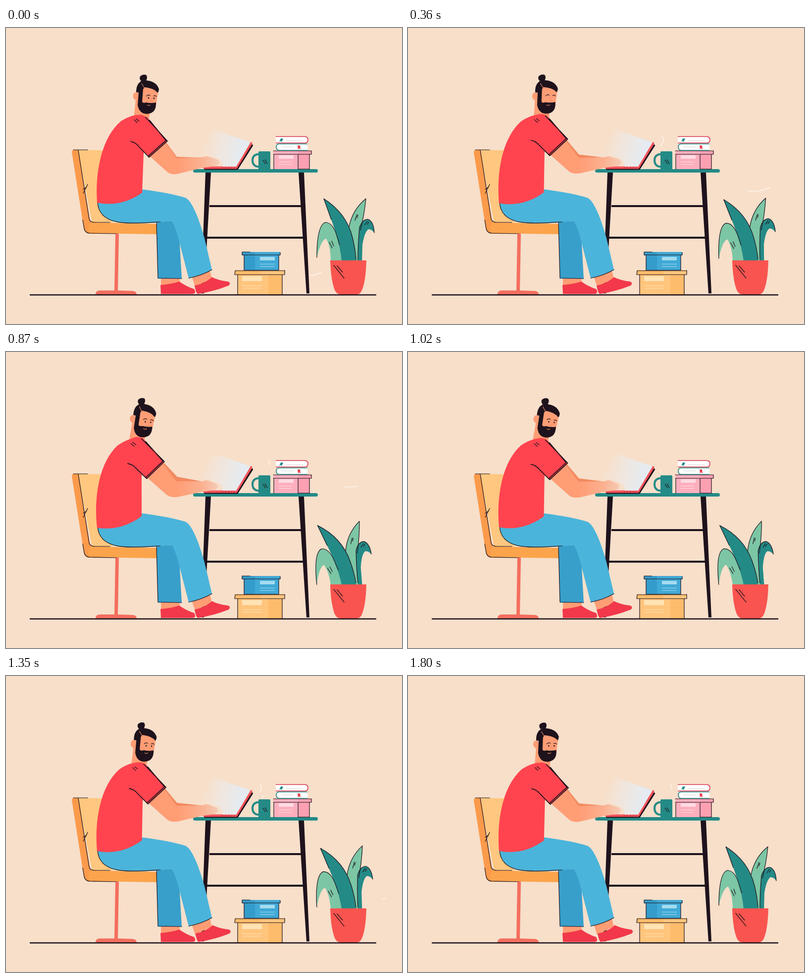
These frames come from a looping animation (800 px wide and 600 px high, 1830 ms). An HTML page:

```html
<!DOCTYPE html>
<html lang="en">
<head>
<meta charset="utf-8">
<title>Working at a desk</title>
<style>
  html, body { margin: 0; height: 100%; overflow: hidden; background: #f7dfca; }
  svg { display: block; width: 100%; height: 100%; }
  .ink { fill: none; stroke: #1e121c; stroke-width: 1.2; stroke-linecap: round; stroke-linejoin: round; }
  .bold { stroke-width: 1.7; }
  .air { fill: none; stroke: #fff6ec; stroke-width: 1.5; }
  .dark { fill: #1e121c; }
  .skin { fill: #ff9d75; }
  .red { fill: #ff444f; }
  .shoe { fill: #f2384a; }
  .teal { fill: #248a86; }
  .mint { fill: #7cc6a5; }
  .edge { fill: none; stroke-linecap: round; stroke-linejoin: round; }
</style>
</head>
<body>
<svg viewBox="0 0 800 600">
  <defs>
    <linearGradient id="glow" gradientUnits="userSpaceOnUse" x1="388" y1="238" x2="472" y2="258">
      <stop offset="0" stop-color="#f7e5d5" stop-opacity="0"/>
      <stop offset=".5" stop-color="#eee8e4" stop-opacity=".75"/>
      <stop offset="1" stop-color="#e5ebf0"/>
    </linearGradient>
    <linearGradient id="armFill" gradientUnits="userSpaceOnUse" x1="345" y1="0" x2="435" y2="0">
      <stop offset="0" stop-color="#ff9d75"/>
      <stop offset=".55" stop-color="#fbb08f"/>
      <stop offset="1" stop-color="#f4d0bd"/>
    </linearGradient>
  </defs>
  <rect width="800" height="600" fill="#f7dfca"/>

  <!-- wind and plant -->
  <g class="air">
    <path id="windLow" d="M611 501C625 504 632 495 642 495H662"/>
    <path id="windSide" d="M708 456C732 460 750 459 767 450"/>
    <path id="windMid" d="M615 330C640 336 652 316 675 326S722 330 745 316"/>
    <path id="windTop" d="M670 268Q692 279 720 269"/>
  </g>
  <g id="leaves">
    <path class="mint" d="M727 346Q724 378 716 410Q711 440 711 482H703Q703 440 693 403Q700 368 727 346Z"/>
    <path class="teal" d="M744 415Q738 407 732 408Q724 414 720 440L719 482H711Q711 440 714 405Q720 387 732 388Q743 393 744 415Z"/>
    <path class="mint" d="M628 465Q628 400 645 394Q660 394 668 420Q677 450 680 482H656Q657 445 647 427Q637 428 628 465Z"/>
    <path class="teal" d="M642 346Q688 375 700 425Q706 450 707 482H679Q676 440 662 402Q652 375 642 346Z"/>
    <g class="ink">
      <path d="M642 346Q688 375 700 425Q706 450 707 470M642 346Q650 368 657 388"/>
      <path d="M693 403Q700 368 727 346Q724 378 716 410"/>
      <path d="M711 470Q711 440 714 405Q720 387 732 388Q743 393 744 415"/>
      <path d="M628 465Q628 400 645 394Q660 394 668 420L674 440"/>
      <path d="M653 434l6 12M658 432l4 10M705 390l4-12M709 385l2-6M725 399l5-7M730 398l3-5"/>
    </g>
  </g>
  <path fill="#f9544f" d="M655 471H728Q727 515 718 534Q714 540 708 540H676Q668 540 664 531Q656 510 655 471Z"/>
  <path class="ink" d="M662 481L683 507M669 482L680 495"/>

  <!-- chair -->
  <path fill="#ffc77f" d="M145 247L197 248L215 394H174Z"/>
  <path fill="#fb9a4b" d="M133 252Q133 247 138 247H146L169 387Q170 395 178 395H200V417H171Q159 417 157 405Z"/>
  <path fill="#fba44c" d="M172 394L304 397V418L168 416Q163 405 172 394Z"/>
  <path class="ink" d="M136 247H165M146 248L168 387Q170 394 180 394H210M155 389L158 407Q160 416 170 416L225 417M156 335L165 317M156 327L163 322"/>
  <path fill="#f46e5e" d="M221 417H228L226 532L256 533Q264 534 264 540H181Q181 532 190 532H219Z"/>

  <!-- desk -->
  <path class="dark" d="M403 293H414L400 538H394ZM591 293H602L613 538H607ZM411 359H597V363H411ZM404 423H601V427H404Z"/>
  <rect class="teal" x="378" y="286" width="252" height="7" rx="3.5"/>

  <!-- boxes on the floor -->
  <path fill="#ffc57d" d="M462 491H563V500H558V540H468V500H462Z"/>
  <path fill="#fdbc6c" d="M530 500H558V540H530ZM462 491H515V500H462Z"/>
  <path fill="#ffe3b5" d="M477 503H517V513H477ZM477 522H517V523H477ZM477 527H517V528H477Z"/>
  <path class="ink" d="M563 491V500H462L463 492H563M468 500V540M558 500V540"/>
  <path fill="#41a9d6" d="M477 454H554V461H551V491H481V461H477Z"/>
  <path fill="#349ccb" d="M481 461H503V491H481ZM477 454H503V461H477Z"/>
  <path fill="#a5dcef" d="M513 464H543V471H513ZM513 478H543V479H513ZM513 483H543V484H513Z"/>
  <path class="ink" d="M493 454H477V460H554V455M481 461V491H551V461"/>

  <!-- box, books and mug on the desk -->
  <path fill="#fdafbe" d="M540 249H617V256H613V286H542V256H540Z"/>
  <path fill="#fca0b2" d="M590 256H613V286H590ZM590 249H617V256H590Z"/>
  <path fill="#ffdbe2" d="M551 258H581V265H551ZM551 271H578V272H551ZM551 276H578V277H551Z"/>
  <path class="ink" d="M540 249H617V256H540M613 256V286H590V256M541 257V286"/>
  <path fill="#fff" stroke="#d63a52" stroke-width="1.7" d="M545 220H604Q610 221 610 226Q610 233 604 233H545"/>
  <path fill="#fff" stroke="#248a86" stroke-width="1.7" d="M609 235H551Q546 236 546 241Q546 247 551 248H609"/>
  <path class="teal" d="M555 224H560L557 231L555 229L552 231Z"/>
  <path fill="#e84250" d="M589 238H594L595 246L592 244L590 246Z"/>
  <path fill="none" stroke="#d8d8dc" d="M565 228H600M556 241H582"/>
  <rect class="teal" x="510" y="250" width="24" height="37" rx="2"/>
  <path fill="none" stroke="#248a86" stroke-width="4" d="M512 256H508Q498 258 498 268Q498 279 508 281H512"/>
  <path class="ink" d="M519 268L524 275M523 267L528 275"/>
  <g class="air">
    <path id="steamA" d="M512 245C506 234 522 236 513 219"/>
    <path id="steamB" d="M518 248C520 238 528 238 519 223"/>
    <path id="steamC" d="M533 247C526 238 536 232 530 218"/>
  </g>

  <!-- legs -->
  <path class="skin" d="M313 506H350L352 518L313 523ZM375 503L412 492L416 508L382 524Z"/>
  <path class="shoe" d="M312 521Q335 519 350 514Q366 525 380 529Q386 539 376 539H313Z"/>
  <path id="foot" class="shoe" d="M381 522Q402 518 416 505Q430 512 449 514Q455 517 450 522Q420 534 388 539Q384 539 381 522Z"/>
  <path fill="#389fcb" d="M304 393L337 391L350 420L355 508H307Z"/>
  <path class="ink" d="M304 395L307 507L355 508"/>
  <path fill="#4bb4da" d="M185 350Q230 350 274 327Q330 334 362 344C376 349 391 390 401 426L416 490Q395 502 369 507L350 433Q343 405 335 391L310 394C245 398 187 403 185 350Z"/>
  <path class="ink" d="M185 354C189 402 245 397 312 393M369 507Q395 502 416 490"/>

  <!-- laptop -->
  <path class="edge" stroke="#1e121c" stroke-width="4" d="M402 285.500H467L497 238"/>
  <path class="edge" stroke="#f5535a" stroke-width="5" d="M401 283H465L495 234"/>
  <path stroke="#c93a48" stroke-width="2" stroke-dasharray="3 3" d="M436 283H462"/>

  <!-- man -->
  <g id="head">
    <path class="skin" d="M263 136L258 184Q275 190 289 184L291 160Z"/>
    <path fill="#f28b65" d="M270 164Q278 174 290 172L289 177Q274 176 270 164Z"/>
    <ellipse class="skin" cx="263" cy="138" rx="6.5" ry="8"/>
    <path class="skin" d="M272 114L298 116Q308 124 307 132L303 156L275 165Z"/>
    <path class="dark" d="M263 130Q263 108 280 106Q304 107 309 124Q308 132 306 131Q299 122 280 120L277 124L275 149Q276 153 283 151Q293 153 303 151Q304 173 285 174Q269 174 266 156L268 131Z"/>
    <path class="dark" d="M271 107L275 109Q268 104 271 98Q276 93 283 95Q287 99 283 107L288 109Z"/>
    <path fill="none" stroke="#ff9d75" d="M274 112L279 121M285 156Q288 159 292 156"/>
    <path fill="none" stroke="#f28b65" d="M294 143L295 148L292 149"/>
    <path class="ink" d="M284 138Q288 134 291 137M298 138Q302 136 304 139"/>
    <g id="eyes" class="dark"><circle cx="288" cy="142" r="1.4"/><circle cx="299" cy="142.500" r="1.4"/></g>
  </g>
  <path id="farArm" fill="#f28a60"/>
  <path id="arm" fill="url(#armFill)"/>
  <path fill="url(#glow)" d="M420 206L494 232L465 281H437Q440 270 427 264Q411 256 385 262Z"/>
  <g id="body">
    <path class="red" d="M184 354C180 300 190 225 232 189Q255 174 275 176L290 190L278 255L275 334Q232 364 184 354Z"/>
    <g id="sleeve">
      <path class="red" d="M252 186Q274 168 290 186L326 229L289 262Q275 247 266 237L252 230Z"/>
      <path class="ink bold" d="M252 230Q262 232 268 240L289 262L326 229L282 181M290 187L323 228L287 260"/>
    </g>
    <path class="ink" d="M259 186L265 192M263 184L269 189"/>
  </g>
  <path d="M48 541H748" stroke="#1e121c" stroke-width="2.6"/>
</svg>
<script>
const LOOP = 1830, STEP = 30;
const el = id => document.getElementById(id);
const set = (id, name, value) => el(id).setAttribute(name, value);

// Smooth track through values at the shared key times
const times = [0, 360, 630, 870, 1200, 1500, 1800];
function track(v, t) {
  let i = 0;
  while (i < 5 && t > times[i + 1]) i++;
  const slope = j => {
    const a = Math.max(j - 1, 0), b = Math.min(j + 1, 6);
    return (v[b] - v[a]) / (times[b] - times[a]);
  };
  const d = times[i + 1] - times[i], u = (t - times[i]) / d, w = 1 - u;
  return v[i] * w * w * (1 + 2 * u) + v[i + 1] * u * u * (3 - 2 * u)
    + d * u * w * (slope(i) * w - slope(i + 1) * u);
}

// A dash of share len runs along the path during each [start, end]
function run(id, t, len, ...spans) {
  const path = el(id), span = spans.find(([a, b]) => t > a && t < b);
  path.style.display = span ? "" : "none";
  if (!span) return;
  const p = (t - span[0]) / (span[1] - span[0]) * (1 + len);
  const total = path.getTotalLength();
  const from = Math.max(0, p - len) * total, to = Math.min(1, p) * total;
  path.setAttribute("stroke-dasharray", `0 ${from} ${to - from} ${total * 2}`);
}

function draw(t) {
  const lean = track([0, .5, 1, .9, .15, .75, .3], t);
  const shift = track([0, -5, -10, -8, -2, -8, -3], t);
  const tilt = track([0, -2, 1, 4, 3, -2, -2], t);
  const hand = track([0, 0, 6, -3, -3, -2, -1], t);
  const sway = 3 - 3 * Math.cos(2 * Math.PI * t / LOOP);

  set("body", "transform", `rotate(${-2.5 * lean} 240 357)`);
  set("sleeve", "transform", `translate(${-lean} ${-4 * lean})`);
  set("head", "transform", `translate(${shift} ${-lean}) rotate(${tilt} 286 160)`);
  set("leaves", "transform", `rotate(${-sway} 690 470)`);
  set("foot", "transform", `translate(${track([0, 0, 1, 0, 1, 2, 2], t)} 0)`);
  el("eyes").style.display = t > 290 && t < 430 ? "none" : "";

  set("arm", "d", `M${285 - 5 * lean} ${255 - 5 * lean}L${326 - 2 * lean} ${292 - 3 * lean}
    Q${335 - 3 * lean} ${299 - 3 * lean} 350 ${295 - 2 * lean}L398 283L${424 + hand} 280
    Q${439 + hand} 271 ${423 + hand} 265L412 262Q405 258 398 262
    L${345 - lean} ${264 - 2 * lean}L${322 - 6 * lean} ${232 - 7 * lean}L290 235Z`);
  set("farArm", "d", `M305 235L${323 - 4 * lean} ${231 - 7 * lean}
    L${345 + lean} ${261 - 9 * lean}L400 263V275H335Z`);

  run("windLow", t, .5, [-130, 240], [1370, 1740]);
  run("windSide", t, .7, [950, 1380]);
  run("windMid", t, .34, [30, 530], [520, 810]);
  run("windTop", t, .5, [760, 970]);
  run("steamA", t, 1, [50, 580], [960, 1530]);
  run("steamB", t, .9, [335, 850], [1300, 1700]);
  run("steamC", t, .8, [510, 980], [1430, 1900]);
}

function frame(now) {
  draw(Math.floor(now % LOOP / STEP) * STEP);
  requestAnimationFrame(frame);
}
requestAnimationFrame(frame);
</script>
</body>
</html>
```
